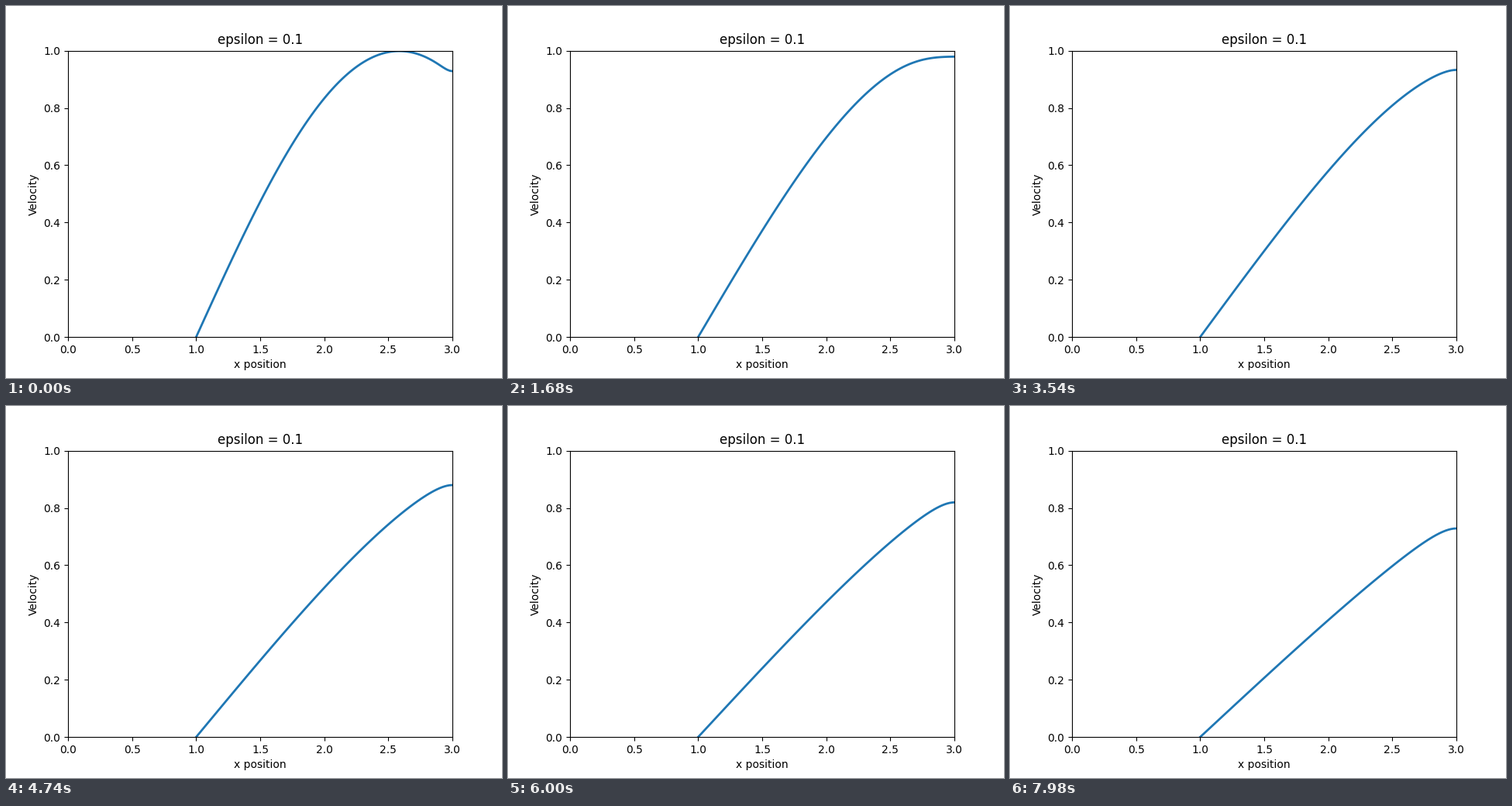
Write a matplotlib script that moves like this. It is 640x480 px and loops after 8000 ms.

```python
import numpy as np
import matplotlib.pyplot as plt
from matplotlib.animation import FuncAnimation

EPS = 0.1
LOOP_MS, STEP_MS, TICK_MS = 8000, 60, 20
STEPS = -(-LOOP_MS // STEP_MS)
T_START, T_STEP = 0.015, 0.01   # simulated time at the start and per step
DT = 0.0005

x = np.linspace(1, 3, 101)
dx = x[1] - x[0]


def advance(u, duration):
    """Viscous Burgers equation: u = 0 on the left, zero slope on the right."""
    for _ in range(round(duration / DT)):
        left = u[:-1]
        right = np.append(u[2:], u[-2])
        mid = u[1:]
        slope = (right - left) / (2 * dx)
        bend = (right - 2 * mid + left) / dx**2
        u = np.append(0.0, mid + DT * (EPS * bend - mid * slope))
    return u


profiles = [advance(np.sin(x - 1), T_START)]
for _ in range(STEPS - 1):
    profiles.append(advance(profiles[-1], T_STEP))

plt.rcParams["font.family"] = "DejaVu Sans"
fig, ax = plt.subplots(figsize=(6.4, 4.8), dpi=100)
ax.set(xlim=(0, 3), ylim=(0, 1), xlabel="x position", ylabel="Velocity",
       title=f"epsilon = {EPS}")
line, = ax.plot(x, profiles[0], lw=2)


def update(tick):
    line.set_ydata(profiles[tick * TICK_MS // STEP_MS])
    return line,


anim = FuncAnimation(fig, update, frames=LOOP_MS // TICK_MS,
                     interval=TICK_MS, repeat=True, repeat_delay=0)
plt.show()
```
